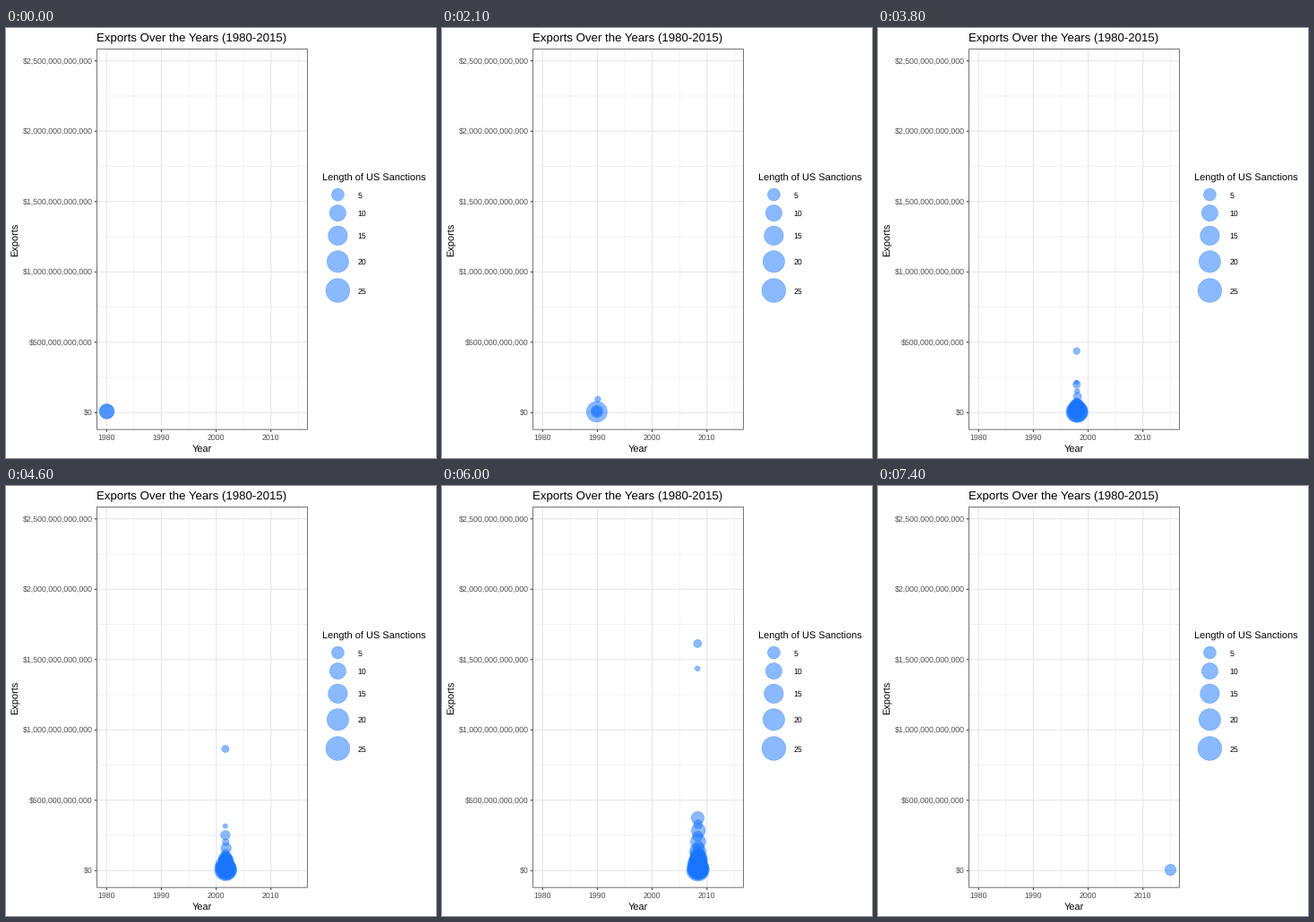
These frames come from a looping animation (480x480 px, 7.5 s). A matplotlib script:

```python
import numpy as np
import matplotlib.pyplot as plt
from matplotlib.animation import FuncAnimation
from matplotlib.patches import Rectangle

plt.rcParams.update({"font.family": "Liberation Sans", "text.hinting": "none"})

SIZE, DPI, FRAMES = 480, 96, 75
PX = 72 / DPI  # points per pixel
BLUE = (24 / 255, 117 / 255, 1, 0.5)
LEFT, RIGHT, TOP, BOTTOM = 101.5, 336.5, 23.5, 448.2

fig = plt.figure(figsize=(SIZE / DPI, SIZE / DPI), dpi=DPI, facecolor="white")
ax = fig.add_axes([0, 0, 1, 1])
ax.set(xlim=(0, SIZE), ylim=(SIZE, 0))
ax.axis("off")


def px_x(year):
    return 112.3 + 6.115 * (year - 1980)


def px_y(trillions):
    return 429.3 - 157.04 * trillions


def line(x, y, color, width):
    ax.plot(x, y, color=color, lw=width * PX, zorder=1, snap=False,
            solid_capstyle="butt")


def label(x, y, s, size, color="black", **kw):
    ax.text(x, y, s, fontsize=size * PX, color=color, va="baseline", **kw)


def areas(radii):
    return (2 * (np.asarray(radii) - 0.3) * PX) ** 2


def bubbles(x, y, r):
    return ax.scatter(x, y, s=areas(r), facecolors=[BLUE], edgecolors=[BLUE],
                      linewidths=0.6 * PX, zorder=3)


def draw_axes():
    for year in range(1985, 2016, 10):
        line([px_x(year)] * 2, [TOP, BOTTOM], "#ebebeb", 0.6)
    for k in range(5):
        line([LEFT, RIGHT], [px_y(0.25 + 0.5 * k)] * 2, "#ebebeb", 0.6)
    for year in range(1980, 2011, 10):
        x = px_x(year)
        line([x, x], [TOP, BOTTOM], "#e6e6e6", 1.07)
        line([x, x], [BOTTOM, BOTTOM + 2.7], "#333333", 1.07)
        label(x, 460.4, str(year), 8.8, "#4d4d4d", ha="center")
    for k in range(6):
        y = px_y(0.5 * k)
        line([LEFT, RIGHT], [y, y], "#e6e6e6", 1.07)
        line([LEFT - 2.7, LEFT], [y, y], "#333333", 1.07)
        label(97, y + 3, f"${k * 500_000_000_000:,}", 8.8, "#4d4d4d", ha="right")
    label(101.4, 15, "Exports Over the Years (1980-2015)", 13.2)
    label(219, 472.7, "Year", 11, ha="center")
    label(13, 236, "Exports", 11, rotation=90, ha="center", rotation_mode="anchor")
    return ax.add_patch(Rectangle((LEFT, TOP), RIGHT - LEFT, BOTTOM - TOP, fill=False,
                                  ec="#7a7a7a", lw=1.07 * PX, zorder=5, snap=False))


def draw_legend():
    label(353, 171, "Length of US Sanctions", 11)
    lengths = np.arange(5, 26, 5)
    r = 2.05 + 2.31 * np.sqrt(lengths)
    y = 186 + np.append(0, np.cumsum(1.24 * (r[1:] + r[:-1])))
    bubbles(np.full(5, 370.4), y, r)
    for length, cy in zip(lengths, y):
        label(392.6, cy + 3.5, str(length), 8.8)


# Crowd of small exporters near zero
N = 46
rng = np.random.default_rng(7)
RANK = rng.random(N) ** 2
BIRTH = 1988.5 + 17 * np.sqrt(np.arange(N) / N)
REACH = 5 + 7.3 * rng.random(N) * (1 - 0.3 * RANK)
SHIFT = rng.uniform(-0.8, 0.6, N)


def crowd(year):
    growth = np.clip((year - 1988) / 22, 0, 1.2)
    rows = np.column_stack([SHIFT, 0.003 + 0.125 * RANK * growth, REACH])
    return rows[BIRTH <= year]


def long_sanctioned(year):
    rows = [(0, 0.009, 6.5 + 2 * np.exp((1980 - year) / 9))]
    if year < 1985.9:
        rows.append((0.4, 0.008, 8.5 + 0.45 * (year - 1980)))
    if 1987 < year < 2015:
        rows.append((-0.2, 0.006, 11.7 + 0.06 * (year - 1987)))
    return rows


def leaders(year):
    rows = []
    slow, steep = 0.0132 * (year - 1982.7), 0.113 * (year - 1994.1)
    if slow > 0:
        rows.append((0.9 if slow > steep else -0.5, max(slow, steep),
                     3.3 + 0.065 * (year - 1986)))
    if year > 1990:
        value = np.interp(year, [1990, 2001.8, 2005.5, 2010.7, 2014],
                          [0, 0.318, 0.88, 1.885, 2.475])
        rows.append((-0.6, value, 2.6 + 0.03 * (year - 1990)))
    return rows


def middle(year):
    """Mid-sized exporters: the lower the rank, the faster the growth."""
    age = min(year - 2010.7, 1.5)
    return [(0.4 * (k % 3 - 1),
             (0.43 - 0.04 * k) * np.exp((0.06 + 0.014 * k) * age),
             (6.8 + 0.35 * k + 1.3 * (-1) ** k) * (1 + 0.035 * age))
            for k in range(9) if year > 1995 + k / 2]


def points(year):
    """Rows of (x shift, value, radius) alive at the given year."""
    rows = long_sanctioned(year)
    if year < 2015:
        rows += leaders(year) + middle(year) + list(crowd(year))
    return np.array(rows)


panel = draw_axes()
draw_legend()
dots = bubbles([], [], [])
dots.set_clip_path(panel)


def update(i):
    year = 1980 + 35 * i / (FRAMES - 1)
    dx, value, r = points(year).T
    dots.set_offsets(np.column_stack([px_x(year) + dx, px_y(value)]))
    dots.set_sizes(areas(r))
    return [dots]


anim = FuncAnimation(fig, update, frames=FRAMES, interval=100, repeat=True,
                     repeat_delay=0, blit=False)
plt.show()
```
